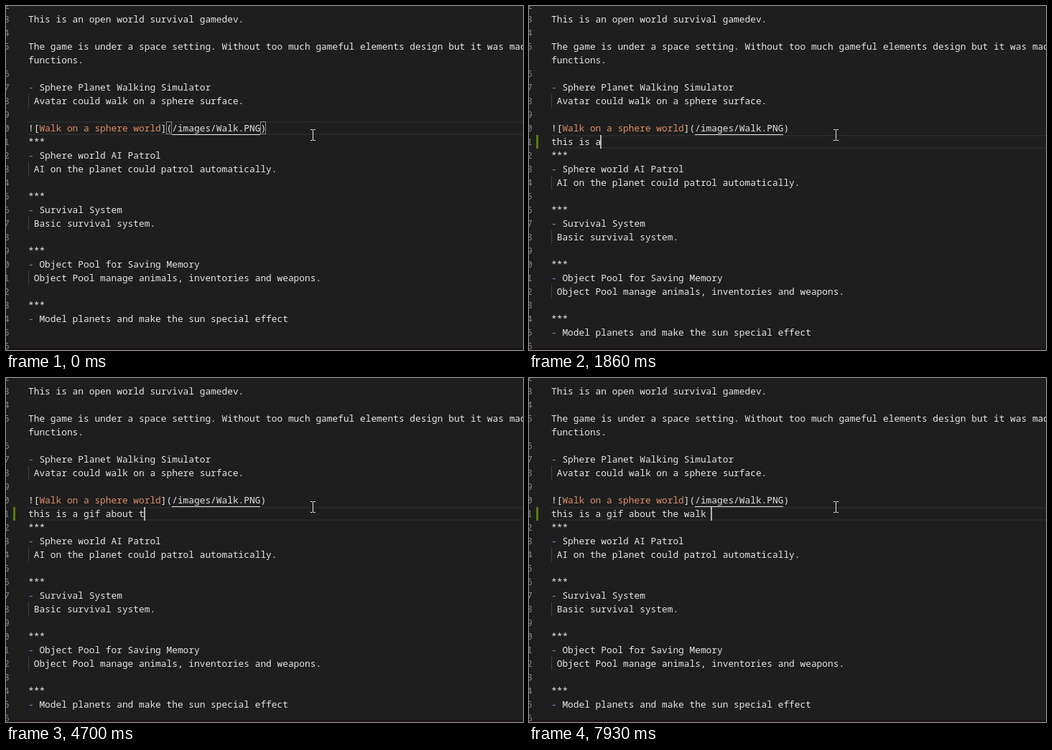
Write an HTML page with a canvas that moves like this. It is 720x480 px and loops after 8 s.

```html
<!DOCTYPE html>
<html lang="en">
<head>
<meta charset="utf-8">
<title>Typing in an editor</title>
<style>
html, body { margin: 0; width: 100%; height: 100%; overflow: hidden; background: #1e1e1e; }
canvas { display: block; }
</style>
</head>
<body>
<canvas id="stage" width="720" height="480"></canvas>
<script>
const ctx = document.getElementById('stage').getContext('2d');
const LOOP = 8000, ENTER = 180, BLINK = 510;
const ROW = 19, TOP = 9, BASE = 14, LEFT = 31, CELL = 7.7;
const TEXT = '#e6e6e6', BLUE = '#6796e6', DIM = '#7f90b2', ORANGE = '#de8f6c', GREY = '#858585';

const head = `This is an open world survival gamedev.

The game is under a space setting. Without too much gameful elements design but it was made
functions.

- Sphere Planet Walking Simulator
 Avatar could walk on a sphere surface.
`.split('\n');

const tail = `***
- Sphere world AI Patrol
 AI on the planet could patrol automatically.

***
- Survival System
 Basic survival system.

***
- Object Pool for Saving Memory
 Object Pool manage animals, inventories and weapons.

***
- Model planets and make the sun special effect`.split('\n');

const LINK = head.length;

// typing bursts: start, gap between keys, keys ("<" deletes)
const bursts = [
  [740, 77, 'this'], [1350, 0, ' '], [1530, 90, 'is '], [1860, 130, 'a '],
  [2400, 130, 'gi'], [3270, 180, 'f '], [3650, 118, 'about '],
  [4700, 50, 'th'], [4900, 30, 'e '], [5590, 570, 'wa'], [6440, 100, 'lk'],
  [7750, 0, ' on'], [7780, 150, '<<']
];

const rowY = row => TOP + row * ROW;
const colX = col => LEFT + col * CELL;

function rect(x, y, w, h, color) {
  ctx.fillStyle = color;
  ctx.fillRect(x, y, w, h);
}

function write(str, row, col, color) {
  ctx.fillStyle = color;
  [...str].forEach((ch, i) => {
    if (ch !== ' ') ctx.fillText(ch, colX(col + i), rowY(row) + BASE);
  });
}

function drawLine(str, row, bullet) {
  if (str[0] === ' ') rect(31, rowY(row), 1, ROW, '#404040');
  write(str, row, 0, TEXT);
  if (str[0] === '-') {
    rect(LEFT, rowY(row), CELL, ROW, '#1e1e1e');
    write('-', row, 0, bullet);
  }
}

function drawNumbers() {
  let n = 2;
  for (let row = -1; row < 25; row++) {
    if (head[row] === 'functions.') continue; // wrapped line
    write(String(n++ % 10), row, -4.4, GREY);
  }
}

function drawActive(row) {
  rect(30, rowY(row), 690, ROW, '#282828');
  rect(30, rowY(row) + 2, 690, ROW - 4, '#1e1e1e');
}

function drawLink(matched) {
  const label = 'Walk on a sphere world', path = '/images/Walk.PNG';
  const open = label.length + 3, close = open + 1 + path.length;
  if (matched) {
    ctx.strokeStyle = '#888888';
    for (const col of [open, close]) {
      ctx.strokeRect(Math.floor(colX(col)) + 0.5, rowY(LINK) + 0.5, 7, ROW - 2);
    }
  }
  write(`![${label}](${path})`, LINK, 0, TEXT);
  rect(colX(2), rowY(LINK) + 2, label.length * CELL, ROW - 4, '#1e1e1e');
  write(label, LINK, 2, ORANGE);
  rect(Math.round(colX(open + 1)), rowY(LINK) + 18, Math.round(path.length * CELL), 1, TEXT);
}

// text typed by time t, and the moment the caret last restarted its blink
function typed(t) {
  let text = '', last = -130;
  for (const [start, gap, keys] of bursts) {
    [...keys].forEach((key, i) => {
      const at = start + i * gap;
      if (t < at) return;
      text = key === '<' ? text.slice(0, -1) : text + key;
      last = at;
    });
  }
  return { text, last };
}

function drawTyping(t) {
  const row = LINK + 1, { text, last } = typed(t);
  rect(10, rowY(row), 3, ROW, '#587c0c');
  write(text, row, 0, TEXT);
  if ((t - last) % (2 * BLINK) < BLINK) {
    const x = Math.max(LEFT, Math.floor(colX(text.length) - 0.6));
    rect(x, rowY(row), 2, ROW, '#b4b5b3');
  }
}

function drawPointer() {
  const c = '#e6e6e6';
  rect(427, 173, 1, 14, c);
  for (const y of [172, 187]) {
    rect(424, y, 3, 1, c);
    rect(428, y, 3, 1, c);
  }
}

function draw(t) {
  const entered = t >= ENTER;
  rect(0, 0, 720, 480, '#1e1e1e');
  rect(0, 477, 720, 3, '#1d1418');
  ctx.font = '500 12.83px "Noto Sans Mono", "DejaVu Sans Mono", monospace';
  drawActive(entered ? LINK + 1 : LINK);
  drawNumbers();
  head.forEach((s, i) => drawLine(s, i, BLUE));
  drawLink(!entered);
  const start = LINK + (entered ? 2 : 1);
  tail.forEach((s, i) => drawLine(s, start + i, entered ? BLUE : DIM));
  if (entered) drawTyping(t);
  drawPointer();
}

const begin = performance.now();
function tick() {
  draw((performance.now() - begin) % LOOP);
  requestAnimationFrame(tick);
}
tick();
</script>
</body>
</html>
```
